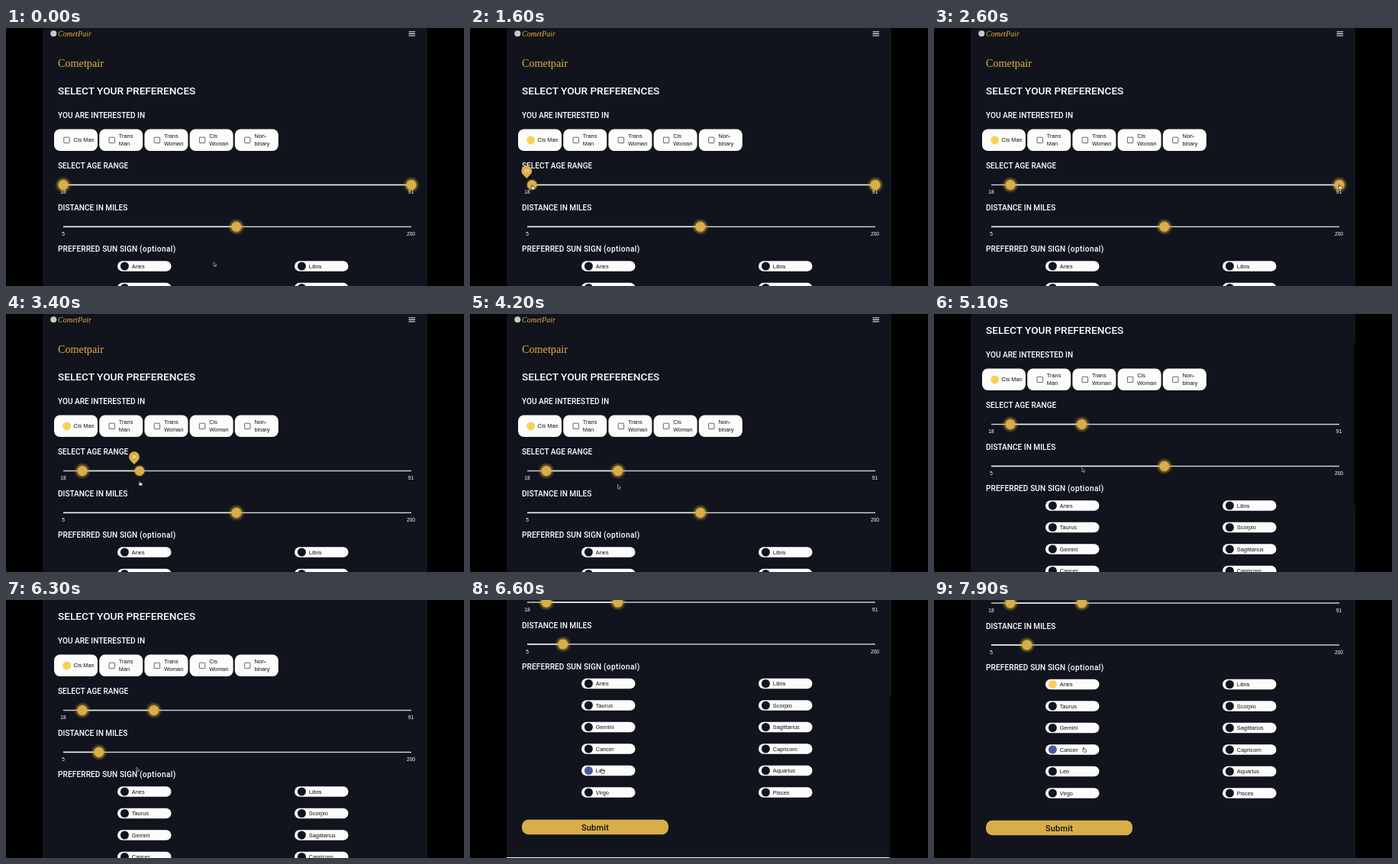
Recreate the animation shown at these times as an HTML page. Size 600 px wide and 338 px high, loop 8000 ms.

```html
<!DOCTYPE html>
<html lang="en">
<head>
<meta charset="utf-8">
<title>Preferences</title>
<style>
  html, body { margin: 0; width: 100%; height: 100%; overflow: hidden; background: #000; }
  svg { display: block; width: 100vw; height: 100vh; }
  text { font-family: "Liberation Sans", Arial, sans-serif; font-size: 7.4px; fill: #111; }
  .head { font: 500 10.1px Roboto, sans-serif; fill: #fff; }
  .title { font-size: 13.65px; }
  .wide { letter-spacing: .1px; }
  .wide tspan { letter-spacing: .4px; }
  .brand { font: 14.2px "Liberation Serif", Times, serif; fill: #e2b03f; }
  .mark { font: italic 10px "Liberation Serif", Times, serif; fill: #e2b03f; }
  .limit { font-size: 6.6px; fill: #fff; text-anchor: middle; }
  .tip text { font-size: 5.4px; fill: #fff; text-anchor: middle; }
  .submit { font: 500 11px Roboto, sans-serif; letter-spacing: .2px; text-anchor: middle; }
  .card { fill: #fcfcfc; }
  .gold { fill: #d8ae4b; }
  .rail { fill: #d6d5d0; }
  .range { fill: #f0eee6; }
  .box { fill: none; stroke: #444; stroke-width: .8; }
</style>
</head>
<body>
<svg viewBox="0 0 600 338" preserveAspectRatio="none">
  <defs>
    <radialGradient id="glow">
      <stop offset=".5" stop-color="#e8b83f" stop-opacity=".8"/>
      <stop offset=".72" stop-color="#d8a530" stop-opacity=".35"/>
      <stop offset="1" stop-color="#d8a530" stop-opacity="0"/>
    </radialGradient>
    <clipPath id="panel"><rect x="48" width="504" height="338"/></clipPath>
  </defs>
  <rect width="600" height="338"/>
  <g clip-path="url(#panel)">
    <rect x="48" width="504" height="338" fill="#11141d"/>
    <g id="page">
      <circle cx="62.3" cy="7.3" r="4" fill="#c9c9cb"/>
      <text class="mark" x="68" y="11">CometPair</text>
      <path d="M527.5 5h8.5M527.5 7.5h8.5M527.5 10h8.5" stroke="#fff" stroke-width="1"/>
      <text class="brand" x="68" y="50.5">Cometpair</text>
      <text class="head title" x="68" y="87">SELECT YOUR PREFERENCES</text>
      <text class="head" x="68" y="118">YOU ARE INTERESTED IN</text>
      <text class="head" x="68" y="184.3">SELECT AGE RANGE</text>
      <text class="head" x="68" y="239">DISTANCE IN MILES</text>
      <text class="head wide" x="68" y="293.3">PREFERRED SUN SIGN <tspan>(optional)</tspan></text>
      <rect class="gold" x="68" y="490.3" width="192" height="19.4" rx="8.5"/>
      <text class="submit" x="164" y="504">Submit</text>
      <rect x="48" y="539.5" width="504" height="20" fill="#eee"/>
    </g>
    <rect id="bar" x="549.5" width="2.5" rx="1" fill="#07080b"/>
  </g>
  <g id="cursor">
    <path id="arrow" d="M0 0V5.4L1.3 4.3L2.3 6.3L3.1 5.9L2.3 4H4Z" fill="#111" stroke="#ccc" stroke-width=".6"/>
    <path id="hand" d="M-.5 .5Q0 -.3 .6 .5V2.2L3.2 2.8Q3.9 3 3.7 4L3.2 6.2H.2L-1.6 3.8Q-1.5 3 -.5 3.6Z" fill="#fff" stroke="#222" stroke-width=".7"/>
  </g>
</svg>
<script>
const LOOP = 8000, STEP = 100;
const VIEW = 338, PAGE = 539.5;
const DARK = "#11141d", YELLOW = "#fbcf5c", BLUE = "#4b5c93";
const byId = id => document.getElementById(id);
const page = byId("page"), bar = byId("bar"), cursor = byId("cursor");

function add(parent, tag, attrs, text) {
  const el = document.createElementNS("http://www.w3.org/2000/svg", tag);
  for (const key in attrs) el.setAttribute(key, attrs[key]);
  if (text !== undefined) el.textContent = text;
  return parent.appendChild(el);
}
const show = (el, on) => { el.style.display = on ? "" : "none"; };
const move = (el, x, y) => el.setAttribute("transform", `translate(${x} ${y})`);

const part = (t, from, to) => Math.min(1, Math.max(0, (t - from) / (to - from)));
const easeOut = p => Math.sin(p * Math.PI / 2);
const easeBoth = p => p * p * (3 - 2 * p);

// A start value plus eased gestures: { from, to, by }
const travel = (base, gestures, t) =>
  gestures.reduce((sum, g) => sum + g.by * easeOut(part(t, g.from, g.to)), base);
const active = (gestures, t, lead, tail) =>
  t >= gestures[0].from - lead && t < gestures[gestures.length - 1].to + tail;

// Interest cards
["Cis Man", "Trans|Man", "Trans|Woman", "Cis|Woman", "Non-|binary"].forEach((label, i) => {
  const x = 63 + i * 59.2, lines = label.split("|");
  add(page, "rect", { class: "card", x, y: 132.5, width: 57, height: 28.5, rx: 7.5 });
  add(page, "rect", { class: "box", x: x + 12.8, y: 143.2, width: 7.4, height: 7.4, rx: .6 });
  lines.forEach((line, n) =>
    add(page, "text", { x: x + 25.6, y: lines.length > 1 ? 144 + n * 10.4 : 149.3 }, line));
});
const box = page.querySelector(".box");
const dot = add(page, "circle", { cx: 79.7, cy: 146.9, r: 5.5, fill: YELLOW });

// Sun signs
const signs = ["Aries", "Taurus", "Gemini", "Cancer", "Leo", "Virgo", "Libra", "Scorpio",
  "Sagittarius", "Capricorn", "Aquarius", "Pisces"].map((name, i) => {
  const x = i < 6 ? 146 : 378, y = 312 + (i % 6) * 28.5;
  add(page, "rect", { class: "card", x, y: y - 6.8, width: 70.5, height: 13.6, rx: 6.8 });
  const mark = add(page, "circle", { cx: x + 9.4, cy: y, r: 5.5 });
  add(page, "text", { x: x + 18.8, y: y + 2.5 }, name);
  return { x, y, mark };
});

// Sliders
const LEFT = 75, RIGHT = 531;
function slider(y, min, max) {
  add(page, "rect", { class: "rail", x: LEFT, y: y - .7, width: RIGHT - LEFT, height: 1.4 });
  const range = add(page, "rect", { class: "range", y: y - .7, height: 1.4 });
  add(page, "text", { class: "limit", x: LEFT, y: y + 11.8 }, min);
  add(page, "text", { class: "limit", x: RIGHT - .5, y: y + 11.8 }, max);
  const pos = v => LEFT + (v - min) / (max - min) * (RIGHT - LEFT);
  const fill = (a, b) => {
    range.setAttribute("x", a);
    range.setAttribute("width", b - a);
  };
  return { y, pos, fill };
}
function thumb(track, value, drags) {
  const g = add(page, "g", {});
  const glow = add(g, "circle", { fill: "url(#glow)" });
  add(g, "circle", { class: "gold", r: 6.3 });
  const tip = add(g, "g", { class: "tip", transform: "translate(-7 -18.4)" });
  add(tip, "path", { class: "gold", d: "M0 9.9L-5 5A7 7 0 1 1 5 5Z" });
  const label = add(tip, "text", { y: 1.9 });
  return t => {
    const v = Math.round(travel(value, drags, t));
    const x = track.pos(v), held = active(drags, t, 0, 100);
    move(g, x, track.y);
    glow.setAttribute("r", held ? 8.5 : 11);
    show(tip, held);
    label.textContent = v;
    return { x, y: track.y, held };
  };
}
const age = slider(205.5, 18, 91), miles = slider(260.4, 5, 200);
const low = thumb(age, 18, [{ from: 1500, to: 2000, by: 4 }]);
const high = thumb(age, 91, [{ from: 2700, to: 3400, by: -57 }, { from: 3500, to: 3800, by: 3 }]);
const reach = thumb(miles, 102.4, [{ from: 5200, to: 5300, by: -46 }, { from: 5400, to: 6000, by: -31.4 }]);

const scrolls = [
  [{ from: 4500, to: 4925, by: 61 }],
  [{ from: 6300, to: 6600, by: 141.5 }, { from: 6700, to: 6900, by: -1 }]
];

// Places the pointer visits: time, x, y
const stops = [
  [100, 272, 306.5], [700, 80, 146], [900, 80, 146], [1400, 75, 205], [2000, 101, 207],
  [2600, 531, 205], [3800, 193.5, 223.5], [4700, 193.5, 223.5], [5200, 194, 199],
  [6000, 122, 200], [6300, 171, 219], [6600, 172.5, 221], [7200, 172, 109], [7900, 196, 193]
];
function pointer(t) {
  const next = Math.max(1, stops.findIndex(s => s[0] >= t));
  const [t0, x0, y0] = stops[next - 1], [t1, x1, y1] = stops[next];
  const p = easeBoth(part(t, t0, t1));
  return { x: x0 + (x1 - x0) * p, y: y0 + (y1 - y0) * p };
}
const inside = (p, x, y, w, h) => p.x > x && p.x < x + w && p.y > y && p.y < y + h;

function draw(t) {
  const top = scrolls.reduce((sum, s) => travel(sum, s, t), 0);
  move(page, 0, -top);
  bar.setAttribute("y", top * VIEW / PAGE);
  bar.setAttribute("height", VIEW * VIEW / PAGE);
  show(bar, scrolls.some(s => active(s, t, -100, 500)));

  const thumbs = [low, high, reach].map(place => place(t));
  age.fill(thumbs[0].x, thumbs[1].x);
  miles.fill(LEFT, thumbs[2].x);

  const at = pointer(t), grabbed = thumbs.find(h => h.held);
  if (grabbed) at.x = grabbed.x;
  move(cursor, at.x, at.y);
  const spot = { x: at.x, y: at.y + top };

  show(box, t < 800);
  show(dot, t >= 800);

  let over = grabbed || inside(spot, 63, 132, 57, 29) ||
    thumbs.some(h => Math.hypot(h.x - spot.x, h.y - spot.y) < 8);
  signs.forEach((s, i) => {
    const hit = inside(spot, s.x, s.y - 6.8, 70.5, 13.6);
    const picked = i === 0 && t >= 7300;
    over = over || hit;
    s.mark.setAttribute("fill", picked ? YELLOW : hit ? BLUE : DARK);
  });
  show(byId("hand"), over);
  show(byId("arrow"), !over);
}

const start = performance.now();
function tick() {
  const t = (performance.now() - start) % LOOP;
  draw(Math.floor(t / STEP) * STEP);
  requestAnimationFrame(tick);
}
tick();
</script>
</body>
</html>
```
